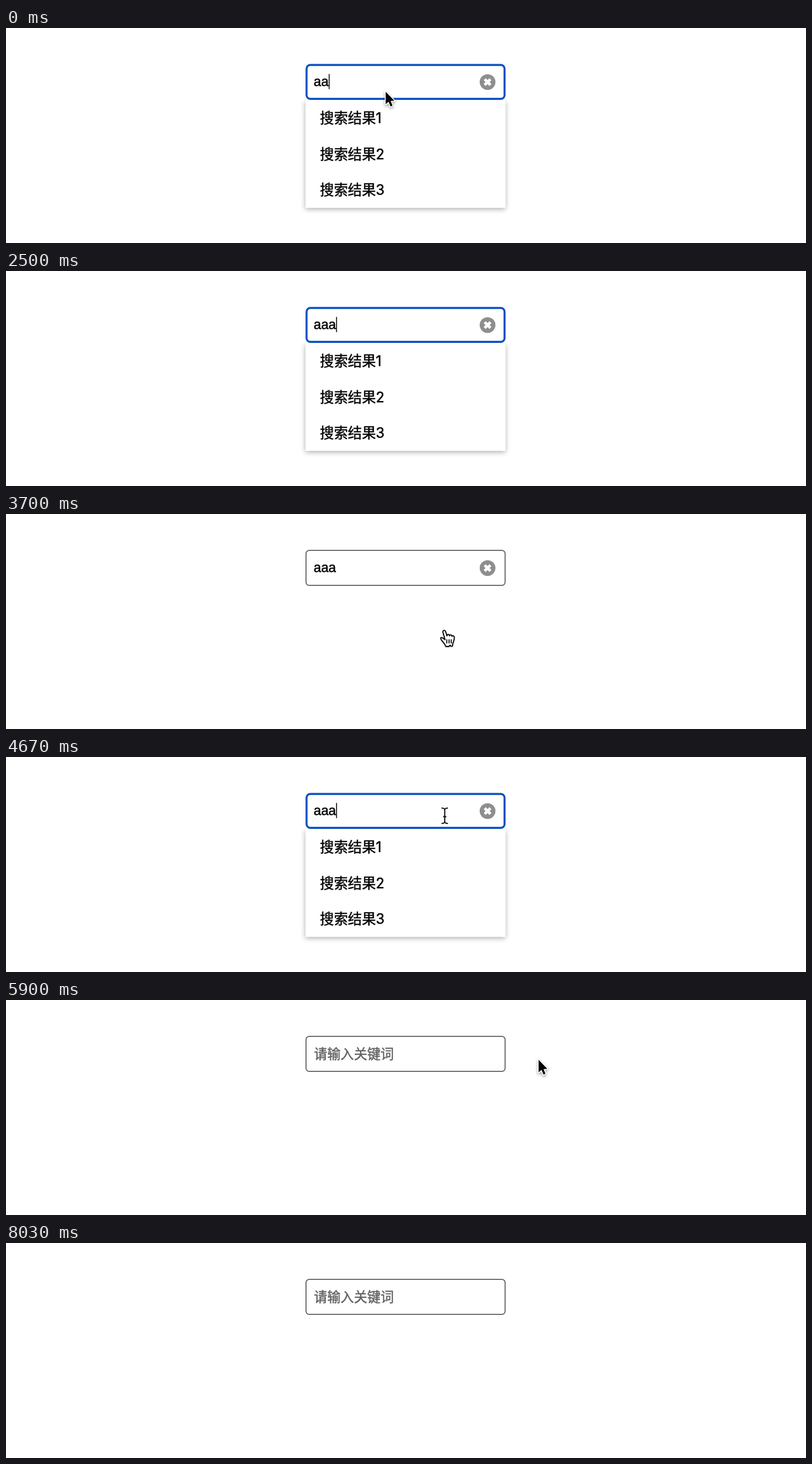
Recreate the animation shown at these times as an HTML page with a canvas. Size 1280 by 344 pixels, loop 8.51 s.

```html
<!DOCTYPE html>
<html lang="zh-CN">
<head>
<meta charset="utf-8">
<title>Search box</title>
<style>
html, body { margin: 0; width: 100%; height: 100%; overflow: hidden; background: #fff; }
canvas { display: block; width: 1280px; height: 344px; }
</style>
</head>
<body>
<canvas id="stage" width="1280" height="344"></canvas>
<script>
const ctx = document.getElementById('stage').getContext('2d');
const LOOP = 8510, FADE = 100, BLINK = 500;
const EM = 64 / 3, ROW = 57.6;
const LATIN = '"Liberation Sans", "Noto Sans CJK SC", "Noto Sans CJK", sans-serif';
const MIXED = 'Inter, "Noto Sans CJK SC", "Noto Sans CJK", sans-serif';
const box = { x: 479.3, y: 57.6, w: 320, h: 57.4 };
const list = { y: box.y + box.h, h: 3 * ROW };
const clearIcon = { x: 770.5, y: 86.5, r: 12.6 };

// What the user does to the field; menu and caret follow from it.
const actions = [{ at: -330, text: 'aa', focus: true }];
function act(at, text, focus = true) { actions.push({ at, text, focus }); }
act(600, 'a');
act(930, '');
for (let i = 1; i <= 3; i++) act(1645 + 285 * i, 'a'.repeat(i));
act(3570, 'aaa', false);
act(4400, 'aaa');
act(5270, '', false);
act(6470, '');
act(7150, '', false);

// Pointer moves, each starting where the last one ended.
const start = { x: 607.5, y: 101 };
const moves = [
  { t: 2930, ms: 570, to: { x: 700, y: 186 }, bend: { x: 890, y: 130 } },
  { t: 3800, ms: 600, to: { x: 702, y: 94 }, bend: { x: 738, y: 142 } },
  { t: 4700, ms: 300, to: { x: 771, y: 87 } },
  { t: 5800, ms: 130, to: { x: 864, y: 96 } },
  { t: 6150, ms: 270, to: { x: 790, y: 95 } },
  { t: 6830, ms: 350, to: { x: 903, y: 108 } },
  { t: 7530, ms: 110, to: { x: 985, y: -32 } }
];

const clamp = u => Math.max(0, Math.min(1, u));
const ease = u => u * u * (3 - 2 * u);
const mix = (a, b, u) => ({ x: a.x + (b.x - a.x) * u, y: a.y + (b.y - a.y) * u });

function pointerAt(t) {
  let p = start;
  for (const m of moves) {
    if (t < m.t) break;
    const u = ease(clamp((t - m.t) / m.ms));
    const bend = m.bend || mix(p, m.to, 0.5);
    p = mix(mix(p, bend, u), mix(bend, m.to, u), u);
  }
  return p;
}

function stateAt(t) {
  const s = { text: '', focus: false, open: false, toggled: 0, caretFrom: 0 };
  for (const a of actions) {
    if (a.at > t) break;
    const open = a.focus && a.text !== '';
    if (open !== s.open) s.toggled = a.at;
    if ((a.focus && !s.focus) || a.text.length > s.text.length) s.caretFrom = a.at;
    Object.assign(s, { text: a.text, focus: a.focus, open });
  }
  const k = clamp((t - s.toggled) / FADE);
  s.alpha = s.open ? k : 1 - k;
  s.caret = s.focus && Math.floor((t - s.caretFrom) / BLINK) % 2 === 0;
  return s;
}

function text(str, x, y, size, family, color) {
  ctx.font = size + 'px ' + family;
  ctx.fillStyle = ctx.strokeStyle = color;
  ctx.lineWidth = 0.45;
  ctx.fillText(str, x, y);
  ctx.strokeText(str, x, y);
}

function shadow(color, blur, dy) {
  ctx.shadowColor = color;
  ctx.shadowBlur = blur;
  ctx.shadowOffsetY = dy;
}
const noShadow = () => shadow('transparent', 0, 0);

function drawMenu(alpha, hovered) {
  if (alpha <= 0) return;
  ctx.save();
  ctx.globalAlpha = alpha;
  ctx.beginPath();
  ctx.rect(0, list.y, 1280, 300);
  ctx.clip();
  shadow('rgba(0,0,0,.32)', 8, 2.5);
  ctx.fillStyle = '#fff';
  ctx.fillRect(box.x, list.y, box.w, list.h);
  noShadow();
  if (hovered >= 0) {
    ctx.fillStyle = '#fafafa';
    ctx.fillRect(box.x, list.y + hovered * ROW, box.w, ROW);
  }
  for (let i = 0; i < 3; i++) {
    text('搜索结果' + (i + 1), 502.3, list.y + 37.2 + i * ROW, EM * 1.05, MIXED, '#000');
  }
  ctx.restore();
}

function drawField(focus) {
  const lw = focus ? 3.2 : 1.5;
  ctx.beginPath();
  ctx.roundRect(box.x + lw / 2, box.y + lw / 2, box.w - lw, box.h - lw, focus ? 6 : 5);
  ctx.fillStyle = '#fff';
  ctx.fill();
  ctx.lineWidth = lw;
  ctx.strokeStyle = focus ? '#0550c0' : '#505050';
  ctx.stroke();
}

function drawClear(hovered) {
  ctx.save();
  ctx.translate(clearIcon.x, clearIcon.y);
  ctx.beginPath();
  ctx.arc(0, 0, clearIcon.r, 0, Math.PI * 2);
  ctx.fillStyle = hovered ? '#7c7c7c' : '#8e8e8e';
  ctx.fill();
  ctx.rotate(Math.PI / 4);
  ctx.fillStyle = '#fff';
  ctx.fillRect(-6.5, -2.3, 13, 4.6);
  ctx.fillRect(-2.3, -6.5, 4.6, 13);
  ctx.restore();
}

function line(shape, color, width) {
  ctx.strokeStyle = color;
  ctx.lineWidth = width;
  ctx.stroke(shape);
}

const arrow = new Path2D('M0 1V21L4.6 17L7.8 24.5L11 23.2L7.9 15.8L13.8 15.2Z');
const hand = new Path2D('M8.5 16L5.2 4.5C4.4 1.2 8.2-.2 9.3 3L11.5 10C12 6.8 15.3 7 15.6 10' +
  'C16.2 7.6 19.3 7.8 19.5 10.8C20.3 9 23 9.5 23.3 12.5C23.6 17 21.5 20 20.6 23L20.4 26.5' +
  'H17.8L16.6 24.8L14.5 26.8H9.6C9 23.5 5.5 20.5 3.2 17.2C.5 13.8 1.2 11.6 4 13Z');
const creases = new Path2D('M11.3 15.5v6.5m3.6 0v-6.5m3.5 0v6.5');
const halfBeam = 'M-5.2 12.3Q0 12.3 0 9.2Q0 12.3 5.2 12.3M0 9.2V0';
const beam = new Path2D(halfBeam + 'M-2.6 1.5H2.6');
beam.addPath(new Path2D(halfBeam), new DOMMatrix().scale(1, -1));

const cursors = {
  arrow() {
    shadow('rgba(0,0,0,.4)', 4, 2);
    line(arrow, '#fff', 3);
    noShadow();
    ctx.fillStyle = '#000';
    ctx.fill(arrow);
  },
  hand() {
    ctx.translate(-6, -1);
    shadow('rgba(0,0,0,.4)', 3, 1.5);
    ctx.fillStyle = '#fff';
    ctx.fill(hand);
    noShadow();
    line(hand, '#000', 1.7);
    line(creases, '#000', 1.6);
  },
  beam() {
    line(beam, '#fff', 3.6);
    line(beam, '#111', 1.8);
  }
};

function drawCursor(kind, p) {
  ctx.save();
  ctx.translate(p.x, p.y);
  ctx.lineJoin = 'round';
  cursors[kind]();
  ctx.restore();
}

function draw(t) {
  const s = stateAt(t), p = pointerAt(t);
  // Typing hides the pointer until it moves again.
  const hidden = t >= actions[1].at && t < moves[0].t;
  const inX = p.x > box.x && p.x < box.x + box.w;
  const inField = inX && p.y > box.y && p.y < list.y;
  const onMenu = inX && s.alpha > 0 && p.y >= list.y && p.y < list.y + list.h;
  const onClear = s.text && Math.hypot(p.x - clearIcon.x, p.y - clearIcon.y) < clearIcon.r;

  ctx.fillStyle = '#fff';
  ctx.fillRect(0, 0, 1280, 344);
  drawMenu(s.alpha, onMenu && !hidden ? Math.floor((p.y - list.y) / ROW) : -1);
  drawField(s.focus);
  if (s.text) {
    text(s.text, 492.3, 93.3, EM, LATIN, '#000');
    drawClear(onClear);
  } else {
    text('请输入关键词', 492.7, 93.5, EM, LATIN, '#626262');
  }
  if (s.caret) {
    ctx.fillStyle = '#000';
    ctx.fillRect(492.9 + s.text.length * EM * 0.55, 73.5, 1.4, 24.3);
  }
  if (hidden) return;
  const resting = t > moves[0].t + moves[0].ms && t < moves[1].t;
  if (onMenu || onClear || resting) drawCursor('hand', p);
  else drawCursor(inField && t > moves[0].t ? 'beam' : 'arrow', p);
}

const began = performance.now();
function tick() {
  draw((performance.now() - began) % LOOP);
  requestAnimationFrame(tick);
}
tick();
</script>
</body>
</html>
```
